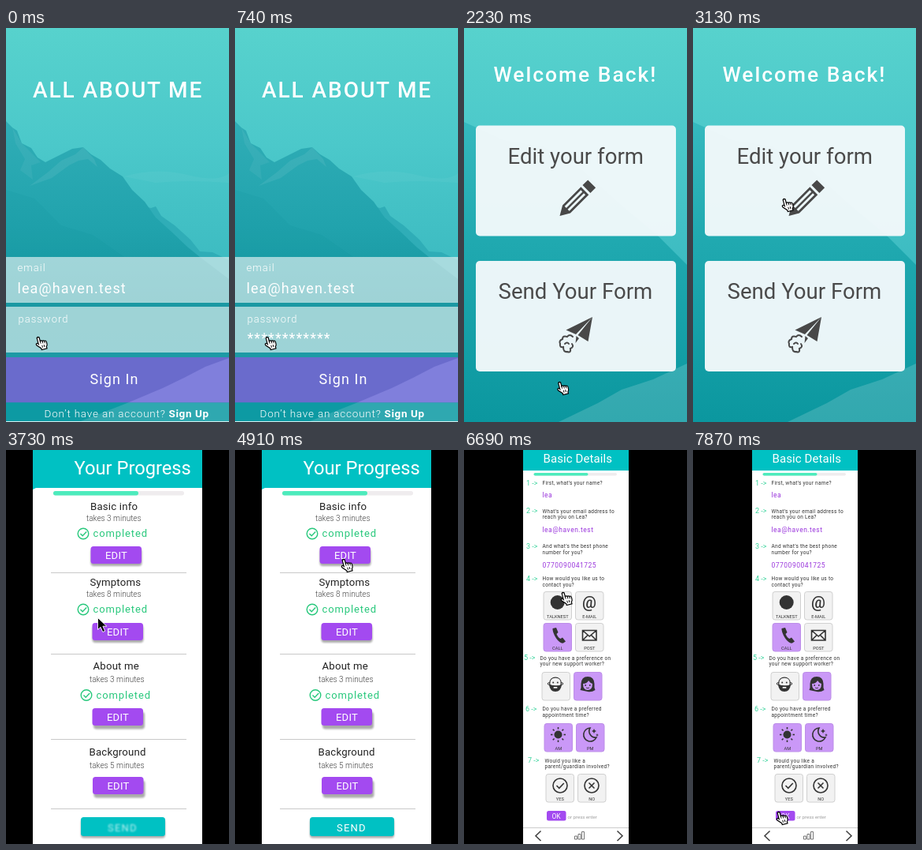
An HTML page for the animation above (8000 ms loop, 283 by 499 pixels).

```html
<!DOCTYPE html>
<html lang="en">
<head>
<meta charset="utf-8">
<title>Form prototype</title>
<style>
  html, body { margin: 0; width: 100%; height: 100%; overflow: hidden; background: #000; }
  svg { display: block; width: 283px; height: 499px; font-family: Roboto, "Open Sans", sans-serif; }
</style>
</head>
<body>
<svg id="stage" viewBox="0 0 283 499"></svg>
<script>
const LOOP = 8000, STEP = 148;
const INK = '#333', TEAL = '#00c1c3', PURPLE = '#a34af0', GREEN = '#28c87c', LILAC = '#ca98f7';

// Drawing helpers, each returning SVG markup
const text = (x, y, size, str, { fill = '#fff', w = 400, ls = 0, mid = false } = {}) =>
  `<text x="${x}" y="${y}" font-size="${size}" fill="${fill}" font-weight="${w}" letter-spacing="${ls}"` +
  `${mid ? ' text-anchor="middle"' : ''}>${str}</text>`;
const rect = (x, y, w, h, fill, r = 0, extra = '') =>
  `<rect x="${x}" y="${y}" width="${w}" height="${h}" rx="${r}" fill="${fill}" ${extra}/>`;
const path = (d, fill, extra = '') => `<path d="${d}" fill="${fill}" ${extra}/>`;
const line = (d, color, w = 1, extra = '') =>
  path(d, 'none', `stroke="${color}" stroke-width="${w}" ${extra}`);
const disc = (x, y, r, fill) => `<circle cx="${x}" cy="${y}" r="${r}" fill="${fill}"/>`;
const ring = (x, y, r, color, w) =>
  `<circle cx="${x}" cy="${y}" r="${r}" fill="none" stroke="${color}" stroke-width="${w}"/>`;
const group = (id, body, extra = '') => `<g id="${id}" ${extra}>${body}</g>`;
const gradient = (id, ...stops) => `<linearGradient id="${id}" x1="0" y1="0" x2="0" y2="1">` +
  stops.map(([at, c]) => `<stop offset="${at}" stop-color="${c}"/>`).join('') + '</linearGradient>';

const defs = '<defs>' +
  gradient('sky', [0, '#57d2cd'], [.3, '#4bc8ca'], [.65, '#3ab9c0'], [1, '#1a9ca6']) +
  gradient('rock', [0, '#30adb6'], [.35, '#21a3ad'], [.6, '#16959f'], [1, '#0d9aa3']) +
  gradient('slope', [0, '#35b9be'], [.4, '#20a9b0'], [1, '#0b979f']) +
  '</defs>';

function login() {
  const ridge = 'M0 118L8 126 14 130 20 146 32 152 40 164 50 170 66 162 84 153 98 151 108 160 120 167' +
    ' 132 178 148 188 160 205 176 220 190 240 210 258 230 277 246 290 283 318V499H0Z';
  const scenery = rect(0, 0, 283, 499, 'url(#sky)') +
    path('M150 188Q190 176 230 186T283 184V196Q230 192 190 196Z', '#fff', 'opacity=".04"') +
    path('M176 226L184 228 190 226 197 238 214 250 234 268 246 283 262 284 283 294V330H200Z', '#2fadb7') +
    path(ridge, 'url(#rock)') +
    path('M98 151L88 160 70 168 54 182 30 200 58 190 80 174 92 168 104 166 116 176 112 166Z', '#fff', 'opacity=".07"') +
    path('M8 126L12 146 24 166 18 180 34 192 32 174 44 170 30 156 20 146Z', '#fff', 'opacity=".05"') +
    path('M0 205L36 216 70 250 110 262 150 290H0Z', '#0b8893', 'opacity=".12"');
  const field = y => rect(0, y, 283, 58, '#e5f3f3', 0, 'opacity=".66"');
  return scenery + field(290) + rect(0, 348, 283, 5, '#1a98a2') + field(353) + rect(0, 411, 283, 6, '#1d9aa5') +
    rect(0, 417, 283, 57.5, '#6a6bcc') +
    path('M155 474.5L199 456 226 443 253 429 283 418V474.5Z', '#807fdc') +
    rect(0, 474.5, 283, 24.5, '#0d9aa3') +
    path('M95 498L155 474.5H283V498Z', '#fff', 'opacity=".14"') + rect(0, 498, 283, 1, '#d5efef') +
    text(34, 88, 28, 'ALL ABOUT ME', { w: 500, ls: 1.9 }) +
    text(14.5, 308, 13, 'email', { w: 300, ls: 1 }) +
    text(14.5, 336, 18, 'lea@haven.test', { ls: 1.1 }) +
    text(15.5, 373, 13, 'password', { w: 300, ls: 1 }) +
    group('secret', text(15.5, 398.5, 18, '*'.repeat(12), { ls: 1.1 })) +
    text(106.5, 451, 18, 'Sign In', { ls: 1.1 }) +
    group('signup', text(48.5, 492.5, 13.5, 'Don’t have an account?', { w: 300, ls: .8 }) +
      text(206.5, 492.5, 13.5, 'Sign Up', { w: 700, ls: .6 }));
}

function welcome() {
  const card = (y, x, label) => rect(15, y, 254, 140, '#f3f9fb', 5, 'opacity=".96"') +
    text(x, y + 48, 27.6, label, { fill: '#4a4a4a' });
  const pencil = path('M0 0L12-7H45V7H12ZM13-4.2H42V-1.2H13ZM13 1.2H42V4.2H13ZM48-7H57.5V7H48Z',
    '#484848', 'fill-rule="evenodd" transform="translate(121.5 238)rotate(-45)"');
  const plane = path('M163 366L129.5 382.5 142 388ZM163 366L144.5 389 157.5 397ZM142.5 390L141.5 399 146 393Z', '#484848') +
    line('M138 391Q134 387 131 391Q125 389 125 394Q120 396 122 400Q121 405 126 404Q126 411 131 410Q136 412 135 406' +
      'Q140 404 137 400M128 400Q131 397 133 400', '#484848', 2, 'stroke-linecap="round"');
  return rect(0, 0, 283, 499, 'url(#sky)') +
    path('M0 119L20 128 50 142 100 150 150 180 200 225 247 264 283 300V499H0Z', 'url(#slope)') +
    path('M120 499L170 475 200 458 240 445 283 425V499Z', '#fff', 'opacity=".16"') +
    text(37.5, 68, 26.4, 'Welcome Back!', { w: 500, ls: 2 }) +
    card(123.5, 55.5, 'Edit your form') + card(295, 43.5, 'Send Your Form') + pencil + plane;
}

function progress() {
  const task = (name, x, y, mins, tx, ty) => text(x, y, 13.2, name, { fill: '#222', ls: .2 }) +
    text(tx, ty, 10, `takes ${mins} minutes`, { fill: '#444', w: 300 });
  const done = (x, y) => ring(x, y, 6.8, GREEN, 1.4) + line(`M${x - 3.5} ${y}l2.7 2.7 5-5.2`, GREEN, 1.4) +
    text(x + 12.5, y + 4, 13, 'completed', { fill: GREEN, ls: .9 });
  const shadow = (x, y, w, h) => rect(x, y, w, h, '#000', 4, 'opacity=".33" style="filter:blur(1.3px)"');
  const edit = (x, y, deep) => shadow(x + deep - 1, y + 2 + deep, 65, 22) +
    rect(x, y, 64.5, 22, PURPLE, 3.5) + text(x + 32.5, y + 15.5, 13, 'EDIT', { ls: .3, mid: true });
  return rect(0, 0, 283, 499, '#000') + rect(34, 0, 215, 499, '#fff') +
    path('M34 0H249V48H38L34 50Z', TEAL) + text(86.5, 30.5, 23.7, 'Your Progress') +
    rect(60, 52, 166, 5.5, '#efecee', 2.7) + rect(60, 52, 108, 5.5, '#4debbc', 2.7) +
    [155.5, 258.5, 366.5, 454.5].map(y => line(`M57 ${y}H229`, '#c9c9c9')).join('') +
    task('Basic info', 107, 76, 3, 102, 89.5) + task('Symptoms', 106.5, 172, 8, 102, 185.5) +
    task('About me', 110.5, 277.5, 3, 106, 293.5) + task('Background', 105.5, 386.5, 5, 106, 402.5) +
    done(98, 106) + done(98, 202) + done(102, 310.5) +
    edit(107.5, 122, 1) + edit(109.5, 219, 1) + edit(109.5, 327, 2.5) + edit(110, 414, 2.5) +
    shadow(95, 467.5, 107, 24) + rect(95, 465, 107, 24, TEAL, 3.5) +
    group('send', text(129, 482.5, 13, 'SEND', { ls: 1.2 }));
}

function details() {
  const question = (n, nx, x, y, ...rows) => text(nx, y + .8, 9, n + ' -&gt;', { fill: '#35d39a' }) +
    rows.map((row, i) => text(x, y + i * 7.5, 6.5, row, { fill: INK, ls: .3 })).join('');
  const answer = (y, str) => text(99.5, y, 8.5, str, { fill: '#9a36dc', ls: .5 });
  const tile = (x, y, label, on) => rect(x, y, 35.5, 35.5, on ? LILAC : '#f2f2f2', 3, `stroke="${on ? '#bd8ee8' : '#d0d0d0'}"`) +
    text(x + 17.8, y + 33, 5.7, label, { fill: INK, mid: true });

  const handset = path('M112.5 226l4.5-1 2.5 6-2 2q2 5 5 6l2.5-1.5 4 5-3 2q-4 1-9-6q-5-8-4.5-12.5z', INK);
  const letter = line('M150.5 228.5H168V241H150.5ZL159.2 236 168 228.5M150.5 241L157 234.5M168 241L161.5 234.5', INK, 1.6);
  const man = ring(107.8, 296, 1.4, INK, 1) + ring(124.2, 296, 1.4, INK, 1) + disc(116, 295.5, 8, INK) +
    path('M109.3 297Q108.5 289 116 288.8T122.7 297Q121 299 116 298.5T109.3 297Z', '#f2f2f2') +
    disc(113.2, 294.5, 1, INK) + disc(118.8, 294.5, 1, INK) +
    path('M108 297Q109 306 116 306T124 297Q121 299 116 298.5T108 297Z', INK) + rect(113.5, 300, 5, 1.8, '#f2f2f2', .9);
  const woman = path('M147.5 304Q149 301 148.5 296Q149 287 157 287T165.5 296Q165 301 166.5 304Q162 307 157 306T147.5 304Z', INK) +
    path('M151 296Q156 296 158 292Q160 295 163 296Q163 304 157 304T151 296Z', LILAC) +
    disc(154.2, 298, .9, INK) + disc(159.8, 298, .9, INK) + line('M155 301q2 1.5 4 0', INK, .9);
  const rays = Array.from({ length: 8 }, (_, i) =>
    line('M0-7V-9.5', INK, 1.6, `transform="translate(119.5 360.5)rotate(${i * 45})"`)).join('');
  const moon = line('M160 352A8.5 8.5 0 1 0 168 364A8 8 0 0 1 160 352Z', INK, 1.6) +
    path('M165 353l1 2 2 1-2 1-1 2-1-2-2-1 2-1zM169 359l.6 1.4 1.4.6-1.4.6-.6 1.4-.6-1.4-1.4-.6 1.4-.6z', INK);
  const yesNo = ring(122, 425, 9, INK, 1.6) + line('M117.5 425l3.3 3.3 6-6.3', INK, 1.6) +
    ring(162, 425, 9, INK, 1.6) + line('M158.5 421.5l7 7m0-7l-7 7', INK, 1.6);
  const footer = text(131.5, 467, 6.2, 'or press enter', { fill: '#777', w: 300 }) +
    line('M97.5 482.5L91 488.7 97.5 495M194.5 482.5L201 488.7 194.5 495', '#444', 1.6) +
    line('M140.5 493V489H143.5V493ZM145 493V486.5H148V493ZM149.5 493V483.5H152.5V493Z', '#666', .9);

  return rect(0, 0, 283, 499, '#000') + rect(75, 0, 134, 499, '#fff') + rect(75, 0, 134, 26, TEAL) +
    text(100.5, 15.5, 15, 'Basic Details', { ls: .1 }) +
    rect(88.5, 29, 105.5, 3.6, '#efecee', 1.8) + rect(88.5, 29, 69, 3.6, '#4debbc', 1.8) +
    question(1, 79, 99.5, 44, 'First, what’s your name?') + answer(60, 'lea') +
    question(2, 79, 99.5, 79.5, 'What’s your email address to', 'reach you on Lea?') + answer(104, 'lea@haven.test') +
    question(3, 79, 99.5, 124, 'And what’s the best phone', 'number for you?') + answer(149, '0770090041725') +
    question(4, 79, 99.5, 165, 'How would you like us to', 'contact you?') +
    question(5, 76, 96.5, 265.5, 'Do you have a preference on', 'your new support worker?') +
    question(6, 78, 99.5, 330, 'Do you have a preferred', 'appointment time?') +
    question(7, 81, 102.5, 395.5, 'Would you like a', 'parent/guardian involved?') +
    tile(101, 179.5, 'TALKNEST') + tile(141.5, 179.5, 'E-MAIL') + tile(101, 219.5, 'CALL', true) + tile(141.5, 219.5, 'POST') +
    tile(99, 281.5, '') + tile(139.5, 281.5, '', true) + tile(102, 346.5, 'AM', true) + tile(142.5, 346.5, 'PM', true) +
    tile(104, 410.5, 'YES') + tile(144.5, 410.5, 'NO') +
    disc(118.7, 193, 9, INK) + text(159, 199.5, 20, '@', { fill: INK, w: 500, mid: true }) +
    handset + letter + man + woman + disc(119.5, 360.5, 5, INK) + rays + moon + yesNo +
    rect(105, 457, 24.5, 12.5, PURPLE, 2.5) + text(117, 466.5, 8.5, 'OK', { mid: true }) +
    line('M75 478.5H209', '#ccc') + group('footer', footer);
}

const hand = path('M4 1.5Q5.5 0 7 1.5V6.5Q8.5 5.5 9.7 7Q11.2 6.2 12.2 7.7Q14.5 7.3 14.5 9.5V12Q14.5 14 13 15V17.5H6V15.5' +
  'L1.5 10.5Q.5 8.5 2 8Q3 8 4 9.5Z', '#fff', 'stroke="#000" stroke-width="1.2"') +
  line('M7 6V9.5M9.7 7V10M12.2 7.7V10.5M8 12V15M10.5 12V15', '#000', .9);
const arrow = path('M.5.5V15.5L4 12.3 6.8 18.5 9.6 17.3 6.9 11.2H11.8Z', '#000', 'stroke="#fff" stroke-width=".9"');

const scenes = [[0, login], [2230, welcome], [3730, progress], [5650, details]];
document.getElementById('stage').innerHTML = defs + scenes.map(([, draw]) => group(draw.name, draw())).join('') +
  group('cursor', group('hand', hand, 'transform="rotate(-15 7.5 9)"') + group('arrow', arrow));
const el = id => document.getElementById(id);
const show = (id, on) => el(id).setAttribute('display', on ? 'inline' : 'none');

// Cursor moves: first step, last step, number of steps, x, y, pointer shape
const moves = [
  [0, 0, 1, 37, 390, 'hand'], [1190, 1640, 4, 117.5, 447, 'hand'], [2980, 3130, 2, 112, 215, 'hand'],
  [3730, 3730, 1, 116, 212, 'arrow'], [4320, 4760, 4, 135, 143, 'arrow'], [4910, 4910, 1, 134, 137, 'hand'],
  [5650, 5650, 1, 138, 134, 'arrow'], [6250, 6540, 3, 126, 168, 'arrow'], [6690, 6690, 1, 122, 179, 'hand'],
  [6830, 7130, 3, 118, 347, 'hand'], [7430, 7870, 4, 105, 457, 'hand'],
];

function placeCursor(t) {
  const i = moves.findLastIndex(m => t >= m[0]);
  const [start, end, n, x, y, shape] = moves[i];
  const [, , , px, py] = moves[Math.max(0, i - 1)];
  const step = n > 1 ? Math.min(n, Math.floor((t - start) / (end - start) * (n - 1) + 1e-6) + 1) : 1;
  const mix = (a, b) => a + (b - a) * step / n;
  el('cursor').setAttribute('transform', `translate(${mix(px, x)} ${mix(py, y)})`);
  show('hand', shape === 'hand');
  show('arrow', shape === 'arrow');
}

// Fresh screens load soft and sharpen in a few steps
function sharpen(id, age) {
  const soft = Math.max(0, 1 - Math.floor(age / STEP) / 4);
  el(id).style.filter = soft ? `blur(${soft * .8}px)` : 'none';
  el(id).style.opacity = 1 - soft * .25;
}

function frame(now) {
  const t = now % LOOP;
  const current = scenes.findLastIndex(([start]) => t >= start);
  scenes.forEach(([, draw], i) => show(draw.name, i === current));
  show('secret', t >= 740);
  el('signup').setAttribute('transform', `translate(${t < 740 ? 0 : -17} 0)`);
  sharpen('send', t - 3730);
  sharpen('footer', t - 5650);
  placeCursor(t);
  requestAnimationFrame(frame);
}
frame(0);
</script>
</body>
</html>
```
